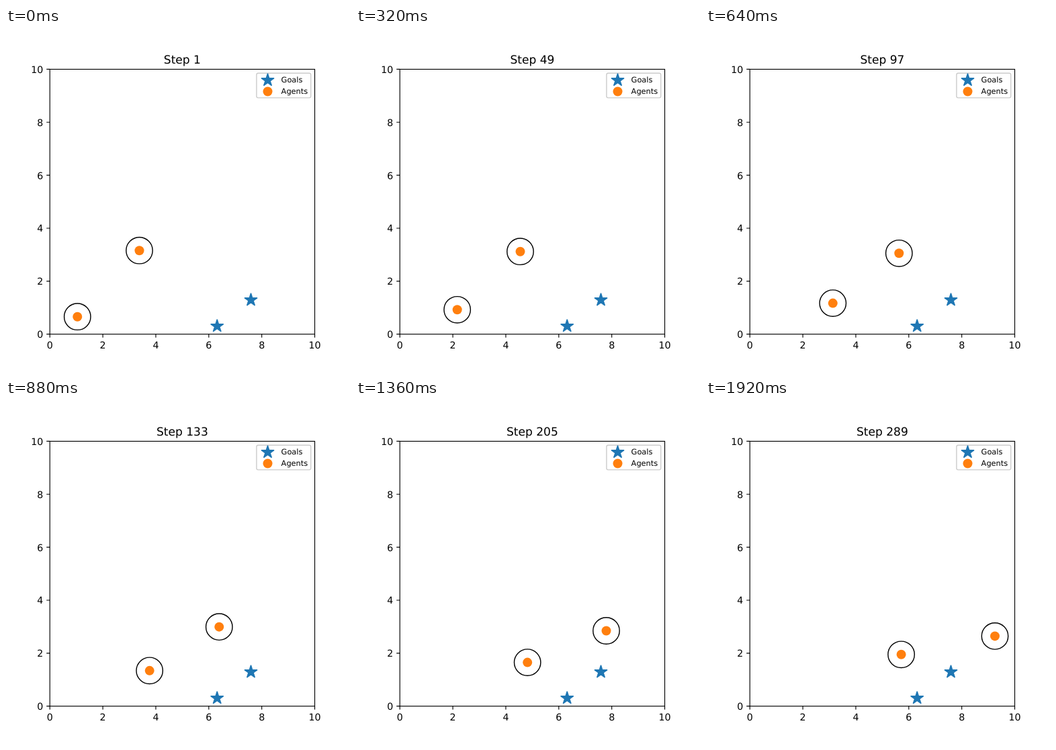
Write an HTML page that moves like this. It is 512 by 512 pixels and loops after 2000 ms.

```html
<!DOCTYPE html>
<html lang="en">
<head>
<meta charset="utf-8">
<title>Agents and goals</title>
<style>
html, body { margin: 0; width: 100%; height: 100%; overflow: hidden; background: #fff; }
svg { display: block; width: 100vw; height: 100vh; }
text { font: 14.22px "DejaVu Sans", Verdana, sans-serif; text-rendering: geometricPrecision; }
text.title { font-size: 17.07px; }
text.small { font-size: 11.38px; }
.mid { text-anchor: middle; }
.end { text-anchor: end; }
.axis { fill: none; stroke: #000; stroke-width: 1.14; }
.ring { fill: none; stroke: #000; stroke-width: 1.42; }
.dot { fill: #ff7f0e; }
.star { fill: #1f77b4; stroke: #1f77b4; stroke-width: 1.4; stroke-linejoin: bevel; }
</style>
</head>
<body>
<svg viewBox="0 0 512 512">
  <defs>
    <path id="star" class="star"/>
    <circle id="dot" class="dot" r="7"/>
  </defs>
  <text id="title" class="title mid" x="262.4" y="52.9"></text>
  <g id="axes"><rect class="axis" x="65.28" y="61.44" width="394.24" height="394.24"/></g>
  <use href="#star" x="364.5" y="404.8"/>
  <use href="#star" x="314.2" y="443.7"/>
  <g class="agent"><use href="#dot"/><circle class="ring" r="19.7"/></g>
  <g class="agent"><use href="#dot"/><circle class="ring" r="19.7"/></g>
  <rect x="372.9" y="67.2" width="80.8" height="36.7" rx="2.3" fill="#fff" stroke="#ccc" stroke-width="1.42"/>
  <use href="#star" x="389.5" y="77.7"/>
  <use href="#dot" x="389.5" y="94.5"/>
  <text class="small" x="409.6" y="80.7">Goals</text>
  <text class="small" x="409.6" y="97.5">Agents</text>
</svg>
<script>
const LEFT = 65.28, BOTTOM = 455.68, UNIT = 39.424;
const FRAME_MS = 80, FRAMES = 25, STEPS_PER_FRAME = 12;

// Agent positions at a few key times, counted in frames.
const keys = [0, 4, 8, 14, 17, 21, 24];
const paths = [
  { x: [106.3, 150.7, 188.8, 235.7, 255.2, 276.8, 290.6],
    y: [429.7, 419.3, 409.6, 396.5, 390.6, 383.5, 378.8] },
  { x: [198.5, 244.5, 287.3, 345.6, 372.5, 406.2, 430],
    y: [331.2, 332.7, 335.3, 340.4, 343.5, 348, 351.4] }
];

const slope = (v, i) => (v[i + 1] - v[i]) / (keys[i + 1] - keys[i]);

function tangent(v, i) {
  if (i === 0) return slope(v, 0);
  if (i === keys.length - 1) return slope(v, i - 1);
  const before = keys[i] - keys[i - 1], after = keys[i + 1] - keys[i];
  return (slope(v, i - 1) * after + slope(v, i) * before) / (before + after);
}

// Cubic Hermite curve through the key values.
function curve(v, t) {
  let i = 0;
  while (i < keys.length - 2 && t >= keys[i + 1]) i++;
  const h = keys[i + 1] - keys[i], s = (t - keys[i]) / h, r = 1 - s;
  return r * r * (1 + 2 * s) * v[i] + s * s * (3 - 2 * s) * v[i + 1]
    + h * s * r * (r * tangent(v, i) - s * tangent(v, i + 1));
}

function add(tag, attrs, text = '') {
  const el = document.createElementNS('http://www.w3.org/2000/svg', tag);
  for (const name in attrs) el.setAttribute(name, attrs[name]);
  el.textContent = text;
  document.getElementById('axes').append(el);
}

for (let n = 0; n <= 10; n += 2) {
  const x = LEFT + n * UNIT, y = BOTTOM - n * UNIT;
  add('path', { class: 'axis', d: `M${x} ${BOTTOM}v5M${LEFT} ${y}h-5` });
  add('text', { class: 'mid', x, y: 476.8 }, n);
  add('text', { class: 'end', x: 55.3, y: y + 5.4 }, n);
}

const corners = Array.from({ length: 10 }, (_, i) => {
  const r = i % 2 ? 3.82 : 10, a = i * Math.PI / 5;
  return `${r * Math.sin(a)} ${-r * Math.cos(a)}`;
});
document.getElementById('star').setAttribute('d', `M${corners.join('L')}Z`);

const title = document.getElementById('title');
const agents = document.querySelectorAll('.agent');
const start = performance.now();

function draw() {
  const frame = Math.floor((performance.now() - start) / FRAME_MS) % FRAMES;
  title.textContent = `Step ${1 + frame * STEPS_PER_FRAME}`;
  paths.forEach(({ x, y }, i) =>
    agents[i].setAttribute('transform', `translate(${curve(x, frame)} ${curve(y, frame)})`));
  requestAnimationFrame(draw);
}
draw();
</script>
</body>
</html>
```
